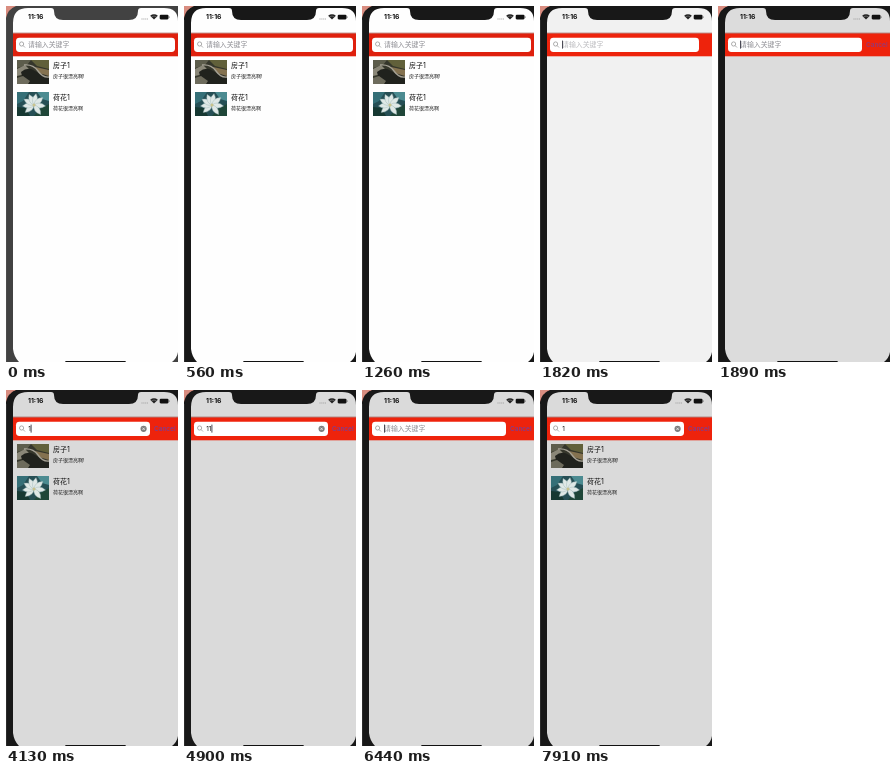
These frames come from a looping animation (172x356 px, 8000 ms). An HTML page:

```html
<!DOCTYPE html>
<html lang="zh">
<head>
<meta charset="utf-8">
<style>
html, body { margin: 0; width: 100%; height: 100%; overflow: hidden; background: #d98d80; }
svg { display: block; width: 100vw; height: 100vh; }
text { font-family: Inter, "Noto Sans CJK SC", "Noto Sans CJK", sans-serif; }
.title { font-size: 7px; fill: #111; }
.note { font-size: 5px; fill: #222; }
</style>
</head>
<body>
<svg viewBox="0 0 172 356">
  <defs>
    <clipPath id="photo"><rect width="32" height="24"/></clipPath>
    <path id="petal" d="M0 0Q-5-5 0-11.5Q5-5 0 0"/>
  </defs>

  <path id="bezel" d="M0 356V12Q2 3 10 0H172V356Z"/>
  <path d="M.5 356V14" stroke="#777" stroke-width=".8" opacity=".25"/>
  <path id="screen" d="M7 343V17Q7 2 22 2H45Q48 2 48 5Q48 14 57 14H123Q132 14 132 5Q132 2 135 2H158Q172 2 172 15V346Q171 352 166 356H13Q8 351 7 343Z"/>
  <path d="M60 355.7H119" stroke="#111" stroke-width="1.6" stroke-linecap="round"/>

  <text x="22" y="13.4" font-size="6.8" font-weight="700" fill="#111">11:16</text>
  <path id="dots" d="M135.5 13H142" stroke="#999" stroke-width="1" stroke-dasharray="1 .9"/>
  <path d="M148 13.6L144.1 9.7Q148 6.8 151.9 9.7Z" fill="#222"/>
  <path d="M145.3 11Q148 9 150.7 11" stroke="#bbb" stroke-width=".4" fill="none"/>
  <rect x="153.7" y="8.8" width="8.8" height="4.6" rx="1.1" fill="#111"/>
  <path d="M163.1 10.3V12" stroke="#555" stroke-width=".7"/>

  <path d="M7 27.2H172" stroke="#8e3c32" stroke-width=".8"/>
  <rect id="bar" x="7" y="27.5" width="165" height="22.8"/>
  <text id="cancel" x="148" y="41.2" font-size="6.5" font-weight="500" fill="#763f9c">Cancel</text>
  <rect id="field" x="10" y="31.8" height="14.2" rx="3.4" fill="#fff"/>
  <g fill="none" stroke="#8c8c8c" stroke-width=".7">
    <circle cx="15.6" cy="38" r="2.1"/>
    <path d="M17.1 39.6L19 41.5"/>
  </g>
  <text id="hint" x="22" y="41.2" font-size="6.9" fill="#8c8c92">请输入关键字</text>
  <text id="typed" x="22.2" y="41" font-size="6.4" fill="#111"></text>
  <rect id="caret" y="34.6" width="1" height="8" fill="#4a4a55"/>
  <g id="clear">
    <circle cx="137.6" cy="38.8" r="3.1"/>
    <path d="M136.4 37.6L138.8 40M138.8 37.6L136.4 40" stroke="#fff" stroke-width=".7"/>
  </g>

  <g id="list">
    <g transform="translate(11 54)" clip-path="url(#photo)">
      <rect width="32" height="24" fill="#35362b"/>
      <path d="M0 0H14L10 5L0 8Z" fill="#5d5d4c"/>
      <path d="M14 0H32V9L20 6Z" fill="#61603a"/>
      <path d="M0 9L8 5L13 10L9 14L0 16Z" fill="#8a8778"/>
      <path d="M18 7L32 10V16L22 13Z" fill="#847250"/>
      <path d="M4 12Q11 6 18 11T32 18V24H7Z" fill="#20221d"/>
      <path d="M7 5Q16 4 21 11T32 17" stroke="#a5a195" stroke-width="1.3" fill="none"/>
      <path d="M0 18L6 16L13 21L11 24H0Z" fill="#6d6b5c"/>
    </g>
    <text class="title" x="47" y="61.6">房子1</text>
    <text class="note" x="47" y="72">房子很漂亮啊!</text>

    <g transform="translate(11 86)" clip-path="url(#photo)">
      <rect width="32" height="24" fill="#264f55"/>
      <path d="M0 0H12L6 9L0 12Z" fill="#356f77"/>
      <path d="M20 0H32V9L25 7Z" fill="#4c8b91"/>
      <path d="M32 24H17L23 17L32 12Z" fill="#1f4638"/>
      <path d="M0 24V15L9 16L13 24Z" fill="#163832"/>
      <g id="lotus" transform="translate(17 13)" fill="#dfe8e6" stroke="#9cb6b6" stroke-width=".4"></g>
      <circle cx="17" cy="13" r="1.5" fill="#c9c38c"/>
    </g>
    <text class="title" x="47" y="93.6">荷花1</text>
    <text class="note" x="47" y="104">荷花很漂亮啊</text>
  </g>
</svg>

<script>
const LOOP = 8000;
const $ = id => document.getElementById(id);
const set = (id, name, value) => $(id).setAttribute(name, value);
const show = (id, opacity) => set(id, 'opacity', Number(opacity));
const within = (t, from, to) => t >= from && t < to;
const grey = v => `rgb(${v},${v},${v})`;

// Latest value of a [time, value] list
const held = (t, keys) => keys.filter(k => k[0] <= t).pop()[1];

$('lotus').innerHTML = [-130, -95, -60, -25, 10, 50, 95, 145]
  .map(a => `<use href="#petal" transform="rotate(${a})"/>`).join('');

const caretKeys = [
  [0, 0], [1820, 1], [2520, .4], [2590, 0], [3010, .5], [3080, 1],
  [3500, 0], [4060, 1], [4620, .4], [4690, 0], [4830, 1],
  [5600, .4], [5670, 0], [5950, .5], [6020, 1], [7700, .4], [7770, 0]
];
const typedKeys = [[0, ''], [3500, '1'], [4830, '11'], [6440, ''], [7210, '1']];
const caretX = [22, 24.6, 27.4];

function draw(t) {
  const active = t >= 1820;
  const typed = held(t, typedKeys);
  const wake = Math.min(1, Math.max(0, (t - 70) / 210));

  set('bezel', 'fill', grey(Math.round(66 - 42 * wake)));
  set('screen', 'fill', grey(held(t, [[0, 254], [1820, 241], [1890, 220], [1960, 218]])));
  set('bar', 'fill', active ? '#ee230c' : '#df200d');
  set('field', 'width', held(t, [[0, 159], [1820, 149], [1890, 134]]));
  show('dots', !within(t, 1820, 1890));
  show('cancel', held(t, [[0, 0], [1890, .8], [1960, 1]]));

  show('hint', typed ? 0 : within(t, 1820, 1890) ? .6 : 1);
  $('typed').textContent = typed;
  set('caret', 'x', caretX[typed.length]);
  show('caret', held(t, caretKeys));
  show('clear', typed !== '');
  set('clear', 'fill', within(t, 6300, 6440) ? '#4a4a4a' : '#7e7e7e');
  show('list', !active || typed === '1');
}

const start = performance.now();
function tick() {
  draw((performance.now() - start) % LOOP);
  requestAnimationFrame(tick);
}
tick();
</script>
</body>
</html>
```
